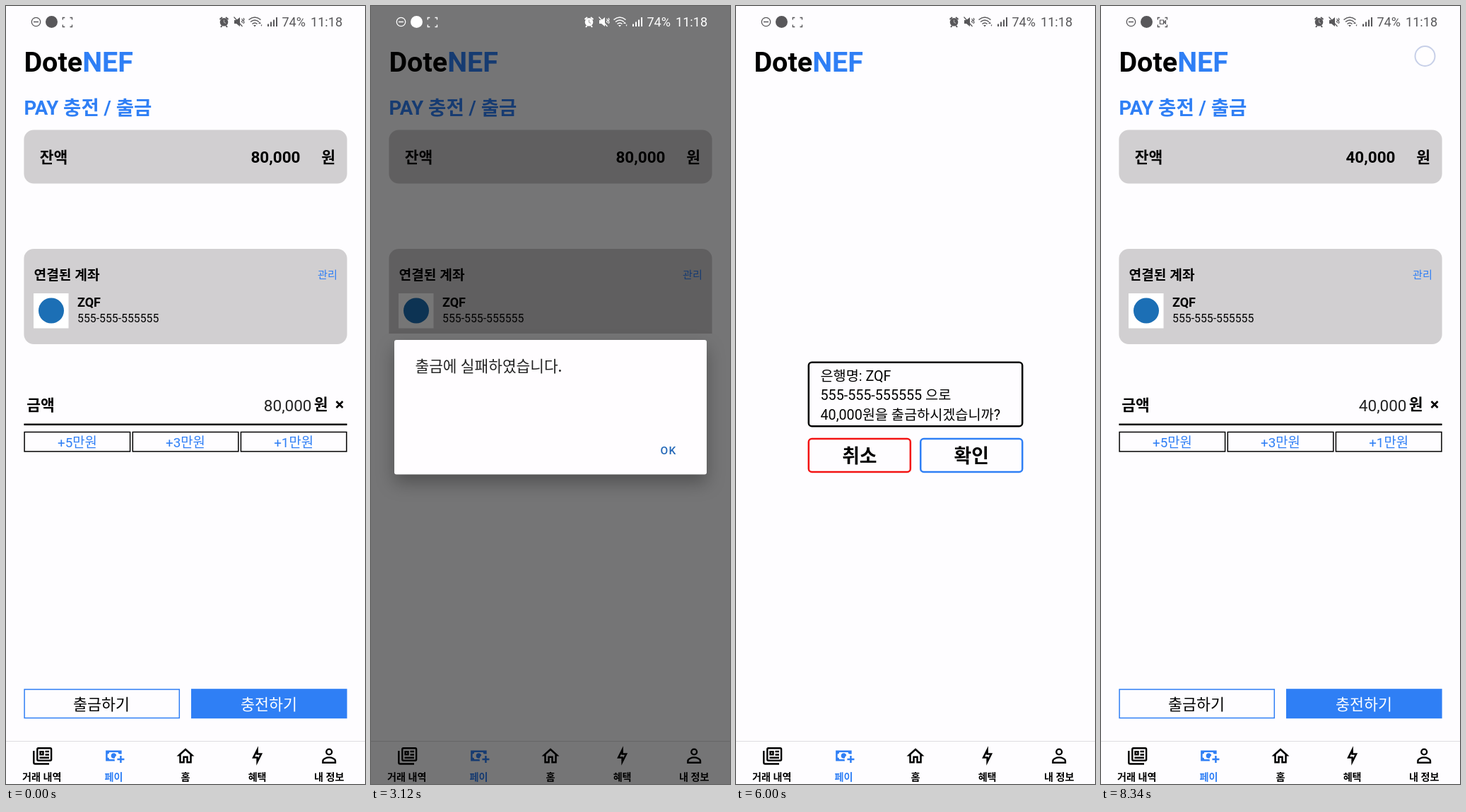
Recreate the animation shown at these times as an HTML page. Size 508 by 1102 pixels, loop 8400 ms.

```html
<!DOCTYPE html>
<html lang="ko">
<head>
<meta charset="utf-8">
<title>Pay</title>
<style>
html, body { margin: 0; width: 100%; height: 100%; overflow: hidden; background: #fefdff; }
svg { display: block; width: 508px; height: 1102px; }
text { font-family: Roboto, "Noto Sans CJK KR", "Noto Sans CJK", sans-serif; white-space: pre; }
.b { font-weight: 700; }
.m { text-anchor: middle; }
.e { text-anchor: end; }
.blue { fill: #2f7ff5; }
.line { fill: none; stroke: #000; }
.blueline { fill: none; stroke: #2f7ff5; }
.card { fill: #d1cfd1; }
.stroke { fill: none; stroke: currentColor; }
#status { fill: currentColor; }
#alert rect { filter: drop-shadow(0 12px 12px rgba(0, 0, 0, .3)); }
</style>
</head>
<body>
<svg viewBox="0 0 508 1102">
  <defs>
    <clipPath id="upper"><rect width="508" height="464"/></clipPath>
  </defs>
  <rect width="508" height="1102" fill="#fefdff"/>
  <text class="b" x="25.400" y="93" font-size="39.500">Dote<tspan class="blue">NEF</tspan></text>

  <g id="pay">
    <text class="b blue" x="25.400" y="153.500" font-size="27.500">PAY 충전 / 출금</text>
    <rect class="card" x="25.400" y="175.500" width="457.200" height="76" rx="14"/>
    <g class="b" font-size="21.500">
      <text x="47.800" y="222">잔액</text>
      <text x="446.300" y="222">원</text>
      <text id="balance" class="e" x="416.500" y="222" font-size="22.500"></text>
      <text x="29.300" y="573">금액</text>
      <text x="435.700" y="571.500">원</text>
    </g>

    <rect class="card" x="25.400" y="344" width="457.200" height="135" rx="14"/>
    <text class="b" x="39.500" y="388" font-size="19.200">연결된 계좌</text>
    <text class="blue" x="441" y="386" font-size="15.200">관리</text>
    <rect x="39" y="407" width="49.500" height="49.500" fill="#fff"/>
    <circle cx="64" cy="431.500" r="18" fill="#1c6fb5"/>
    <text class="b" x="101" y="426" font-size="18">ZQF</text>
    <text x="101" y="448" font-size="15.800">555-555-555555</text>

    <text id="amount" class="e" x="432.500" y="573.500" font-size="22.500" fill="#222"></text>
    <path class="line" d="M467.500 560l9 9m0-9l-9 9" stroke-width="2.600"/>
    <path class="line" d="M25.400 592.700H482.600" stroke-width="2.600"/>
    <path class="line" d="M26.100 603.500h149.500v27.500h-149.500zM179.300 603.500h149.500v27.500h-149.500zM332.400 603.500h149.500v27.500h-149.500z" stroke-width="1.500"/>
    <g class="m blue" font-size="18.800">
      <text x="100.900" y="625">+5만원</text>
      <text x="254" y="625">+3만원</text>
      <text x="407.100" y="625">+1만원</text>
    </g>

    <rect class="blueline" x="26.100" y="968" width="219.200" height="40.500" stroke-width="1.500"/>
    <rect class="blue" x="262" y="967.200" width="220.600" height="42"/>
    <g class="m" font-size="21.700">
      <text x="135" y="997">출금하기</text>
      <text x="372" y="997" fill="#fff">충전하기</text>
    </g>
  </g>

  <g id="ask">
    <rect class="line" x="102.800" y="504.800" width="302.400" height="90.400" rx="4.500" stroke-width="2.500"/>
    <g font-size="19.700">
      <text x="119.500" y="530.500">은행명: ZQF</text>
      <text x="119.500" y="558">555-555-555555 으로</text>
      <text id="question" x="119.500" y="585.500"></text>
    </g>
    <rect class="line" x="102.800" y="613" width="144" height="47" rx="4.500" stroke-width="2.500" style="stroke:#f31313"/>
    <rect class="blueline" x="261.200" y="613" width="144" height="47" rx="4.500" stroke-width="2.500"/>
    <g class="b m" font-size="26.800">
      <text x="174.800" y="647">취소</text>
      <text x="333.200" y="647">확인</text>
    </g>
  </g>

  <path d="M0 1041.500H508" stroke="#dedde0"/>
  <g class="b m" font-size="14.100">
    <text x="50.800" y="1097">거래 내역</text>
    <text class="blue" x="152.400" y="1097">페이</text>
    <text x="254" y="1097">홈</text>
    <text x="355.600" y="1097">혜택</text>
    <text x="457.200" y="1097">내 정보</text>
  </g>
  <g class="line" stroke-width="2.400">
    <rect x="44.300" y="1051.300" width="19.800" height="17.400" rx="1.500"/>
    <path d="M39.300 1055v16.500q0 2 2 2H61"/>
    <path d="M48.500 1056.200h4v4h-4zM55.500 1056h5.500M55.500 1060.500h5.500M47.500 1064.800h13.500"/>
  </g>
  <path class="blue" transform="translate(137.400 1047) scale(1.25)" d="M3 6v12h10.300a6.400 6.400 0 0 1-.3-2H7a2 2 0 0 0-2-2v-4a2 2 0 0 0 2-2h10a2 2 0 0 0 2 2h2V6zm9 3c-1.700 0-3 1.300-3 3s1.300 3 3 3c.4 0 .8-.1 1.100-.2.300-1.100.7-2.200 1.900-3.200C14.900 10.300 13.700 9 12 9m7 3v3h-3v2h3v3h2v-3h3v-2h-3v-3z"/>
  <path transform="translate(239 1047.500) scale(1.25)" d="M12 5.700l5 4.500V18h-2v-6H9v6H7v-7.800zM12 3L2 12h3v8h6v-6h2v6h6v-8h3z"/>
  <path transform="translate(340.600 1047) scale(1.25)" d="M11 9.500V11h3.800L13 14.500V13H9.200zM13 1L6 15h5v8l7-14h-5z"/>
  <g class="line" stroke-width="2.400">
    <circle cx="457.200" cy="1056.500" r="3.900"/>
    <path d="M448.400 1071.800v-2.500c0-3 5.500-4.900 8.800-4.900s8.800 1.900 8.800 4.900v2.500z"/>
  </g>

  <rect id="dim" width="508" height="1102"/>

  <g id="status">
    <circle class="stroke" cx="42.500" cy="22.500" r="6.200" stroke-width="1.300"/>
    <path class="stroke" d="M39 22.500h7" stroke-width="1.500"/>
    <circle cx="64.500" cy="22.500" r="8.500"/>
    <path class="stroke" d="M80.300 19.500v-3h3M90.500 16.500h3v3M93.500 26.500v3h-3M83.300 29.500h-3v-3" stroke-width="1.300"/>
    <path id="camera" class="stroke" d="M83.500 20h5v5.500h-5zM89 22.700l2.500-2v4.200z" stroke-width="1.200"/>
    <circle cx="308.500" cy="22.800" r="5.800"/>
    <path class="stroke" d="M302.500 19l3.500-3M314.500 19l-3.500-3M304 30l1.500-2M313 30l-1.500-2" stroke-width="2"/>
    <path d="M308.500 19.500v3.500l2.500 1.500" fill="none" stroke="#aaa" stroke-width="1.200"/>
    <path d="M323 20h3l5-4v13l-5-4h-3z"/>
    <path class="stroke" d="M322.500 15.500l12 13.500M333.500 18l1.500 2-1.500 2 1.500 2M336 17l1 2-1 2 1 2-1 2" stroke-width="1.200"/>
    <path class="stroke" d="M343.500 19.500q8.500-7 17 0M346 22.500q6-5 12 0M348.500 25.500q3.500-3 7 0" stroke-width="1.600"/>
    <path d="M350 27h4l-2 2.500zM357 25l2-2.500 2 2.500zM360.500 26.500l2 0-1 2.500z"/>
    <path class="stroke" d="M371 29v-3.500M375 29v-6.500M379 29V19.500M383 29V16" stroke-width="2"/>
    <text x="390.500" y="28.700" font-size="18">74%</text>
    <text x="431" y="28.700" font-size="18.100">11:18</text>
  </g>

  <g id="alert">
    <rect x="33" y="473" width="442" height="190.500" rx="3" fill="#fffdff"/>
    <text id="message" x="62.500" y="518" font-size="21.400" font-weight="500" fill="#222"></text>
    <text x="409.500" y="635" font-size="15.500" font-weight="500" letter-spacing="1.200" fill="#2468b8">OK</text>
  </g>

  <circle id="touch" r="14" fill="#fff" fill-opacity=".5" stroke="#a5b3da" stroke-opacity=".62" stroke-width="2"/>
</svg>
<script>
const LOOP = 8400;
const $ = id => document.getElementById(id);

// Start time and value of the typed amount
const amounts = [[0, 80000], [1020, 130000], [1380, 160000], [4200, 0], [4680, 30000], [4980, 40000]];

// Confirmation opens, page returns with the alert, alert closes
const rounds = [
  { ask: 2280, back: 3000, close: 3600, end: 3720, message: '출금에 실패하였습니다.' },
  { ask: 5640, back: 6360, close: 7020, end: 7200, message: '출금 완료!' }
];

// Start, end, x, y
const touches = [
  [840, 1020, 101, 618], [1200, 1380, 254, 618], [2040, 2220, 135, 988],
  [2880, 3000, 333, 638], [3540, 3640, 421, 633], [4080, 4260, 472, 565],
  [4500, 4680, 254, 618], [4800, 4980, 407, 618], [5400, 5580, 135, 988],
  [6060, 6240, 333, 638], [6900, 7060, 421, 633], [8160, 8400, 458.5, 71]
];

const within = (t, a, b) => t >= a && t < b;
const ramp = (t, a, b) => Math.max(0, Math.min(1, (t - a) / (b - a)));
const show = (id, on) => $(id).style.display = on ? '' : 'none';
const money = n => n.toLocaleString('en-US');

function draw(t) {
  const amount = money(amounts.filter(a => a[0] <= t).pop()[1]);
  const round = t < rounds[0].end ? rounds[0] : rounds[1];
  const asking = within(t, round.ask, round.back);
  const fade = ramp(t, round.back, round.back + 135) * (1 - ramp(t, round.close, round.end));

  $('amount').textContent = amount;
  $('balance').textContent = money(t < rounds[1].back ? 80000 : 40000);
  $('question').textContent = amount + '원을 출금하시겠습니까?';
  $('message').textContent = round.message;

  show('pay', !asking);
  show('ask', asking);
  // The lower half of the page is laid out a moment later
  $('pay').setAttribute('clip-path', within(t, round.back, round.back + 180) ? 'url(#upper)' : 'none');
  $('dim').style.opacity = .6 * fade;
  $('alert').style.opacity = Math.min(1, fade * 1.3);
  $('status').style.color = fade > .4 ? '#fff' : '#58575a';

  const blink = t < 7560 ? t : t - 60;
  show('camera', blink % 600 >= 300);

  const touch = touches.find(p => within(t, p[0], p[1]));
  show('touch', touch);
  if (touch) $('touch').setAttribute('transform', `translate(${touch[2]} ${touch[3]})`);
}

const start = performance.now();
function tick() {
  draw((performance.now() - start) % LOOP);
  requestAnimationFrame(tick);
}
tick();
</script>
</body>
</html>
```
